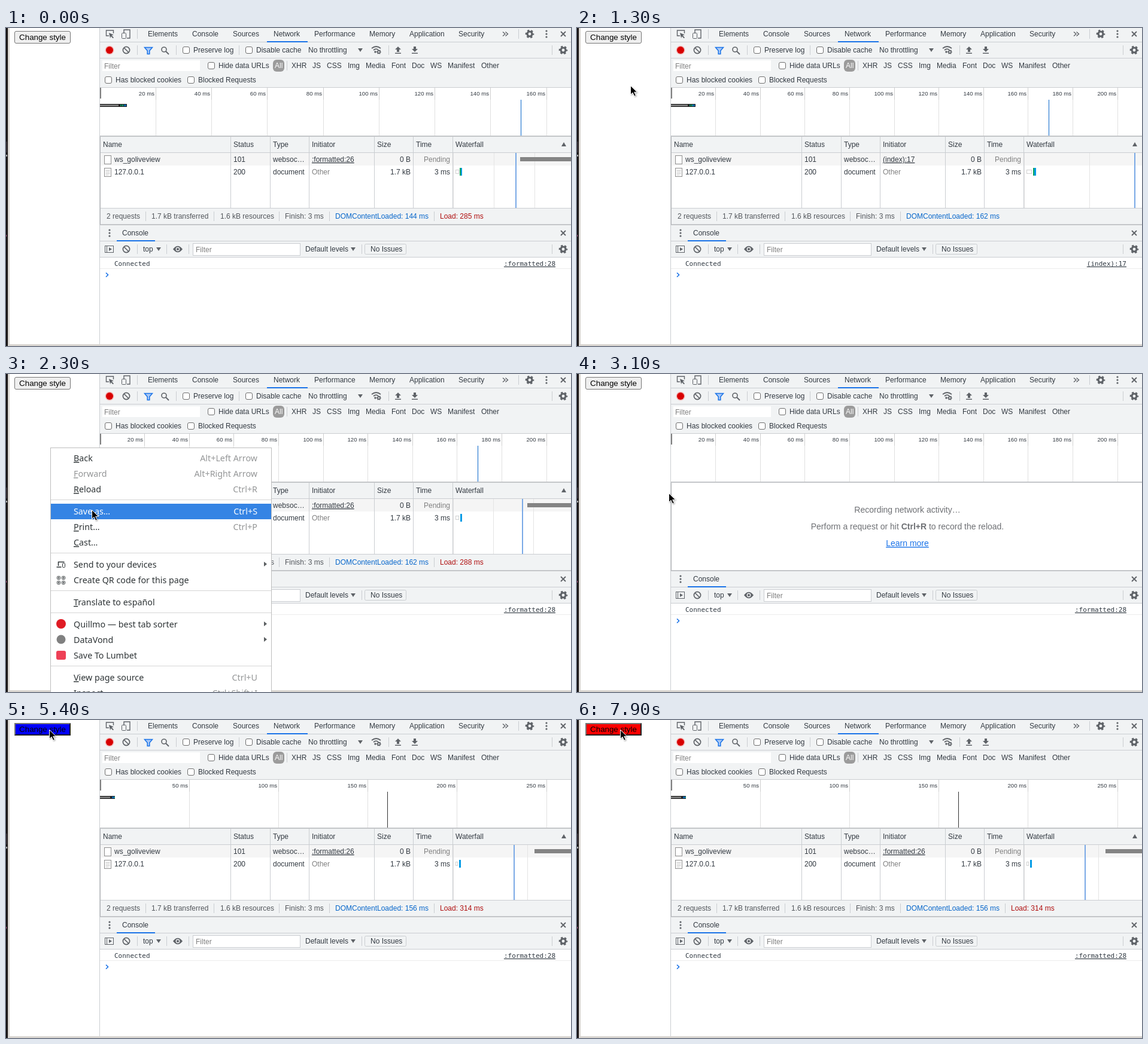
An HTML page for the animation above (8 s loop, 944 by 532 pixels).

```html
<!DOCTYPE html>
<html lang="en">
<head>
<meta charset="utf-8">
<title>Change style</title>
<style>
html, body { margin: 0; width: 100%; height: 100%; overflow: hidden; background: #fff; }
svg { position: absolute; left: 0; top: 0; }
text { font: 12px "Liberation Sans", Arial, sans-serif; fill: #333a42; white-space: pre; }
.mono { font: 11px "DejaVu Sans Mono", monospace; fill: #303942; }
.scale { font-size: 9.6px; }
.big { font-size: 14px; fill: #6e7074; }
.grey { fill: #808080; }
.end { text-anchor: end; }
.mid { text-anchor: middle; }
.link { text-decoration: underline; }
#menu text { font: 14.3px "Noto Sans", "Open Sans", sans-serif; fill: #2e3436; }
#menu .keys, #menu .off text { fill: #949697; }
#menu .on text, #menu .on .keys { fill: #fff; }
#menu .hit { fill: none; }
#menu .on .hit { fill: #3584e4; }
#menu tspan { text-decoration: underline; }
#btn {
  position: absolute; left: 14px; top: 5px; width: 94px; height: 21px; box-sizing: border-box;
  border: 1px solid #767676; border-radius: 3px; background: #efefef; color: #000;
  font: 13.333px/19px "Liberation Sans", Arial, sans-serif; text-align: center; white-space: nowrap;
}
#btn.hover { background: #e5e5e5; }
#btn.press { background: #f5f5f5; }
#btn.red, #btn.blue { border: 2px outset #767676; border-radius: 0; line-height: 17px; }
#btn.red { background: #f00; }
#btn.blue { background: #00f; }
#btn.red.press, #btn.blue.press { border-style: inset; }
</style>
</head>
<body>
<svg id="base" width="944" height="532"></svg>
<div id="btn">Change style</div>
<svg id="over" width="944" height="532"></svg>
<script>
const BAR = '#f1f3f4', LINE = '#cacdd1', INK = '#5f6368', BLUE = '#1a73e8';
const $ = id => document.getElementById(id);
const rect = (x, y, w, h, fill, more = '') =>
  `<rect x="${x}" y="${y}" width="${w}" height="${h}" fill="${fill}" ${more}/>`;
const text = (x, y, s, cls = '', more = '') => `<text x="${x}" y="${y}" class="${cls}" ${more}>${s}</text>`;
const path = (d, color = INK, w = 1.4) => `<path d="${d}" fill="none" stroke="${color}" stroke-width="${w}"/>`;
const solid = (d, fill = INK) => `<path d="${d}" fill="${fill}"/>`;
const box = (x, y, w, h, fill, stroke, r = 0) =>
  rect(x + .5, y + .5, w - 1, h - 1, fill, `stroke="${stroke}" rx="${r}"`);
const circle = (x, y, r, fill, more = '') => `<circle cx="${x}" cy="${y}" r="${r}" fill="${fill}" ${more}/>`;
const each = (list, fn) => list.map(fn).join('');

// Icons
const sep = (x, y) => rect(x, y - 8, 1, 16, LINE);
const check = (x, y) => box(x, y, 12, 12, '#fff', '#6f6f6f', 2.5);
const down = (x, y) => solid(`M${x} ${y}h8l-4 6z`);
const dots = (x, y) => each([-5, 0, 5], d => circle(x, y + d, 1.6, INK));
const cross = (x, y) => path(`M${x - 4} ${y - 4}l8 8m0 -8l-8 8`, INK, 1.8);
const gear = (x, y, s = 1) => `<g transform="translate(${x} ${y}) scale(${s})">` +
  circle(0, 0, 4, 'none', `stroke="${INK}" stroke-width="3.2"`) +
  circle(0, 0, 6, 'none', `stroke="${INK}" stroke-width="2.6" stroke-dasharray="3.2 3.083" stroke-dashoffset="1.6"`) + '</g>';
const ban = (x, y) => circle(x, y, 5.6, 'none', `stroke="${INK}" stroke-width="1.7"`) +
  path(`M${x - 4} ${y - 4}l8 8`, INK, 1.7);

function tabBar() {
  const tabs = [[237, 'Elements'], [311, 'Console'], [379, 'Sources'], [447, 'Network'],
    [515, 'Performance'], [607, 'Memory'], [674, 'Application'], [756, 'Security']];
  return rect(157, 0, 787, 100, BAR) + rect(157, 23, 787, 1, LINE) + rect(436, 22, 68, 2, BLUE) +
    each(tabs, ([x, s]) => text(x, 14, s)) +
    path('M172 13h-4.5v-9h12v5') + solid('M172 8l8 3.4l-3.4 1.2l3.4 3.4l-1.3 1.3l-3.4-3.4l-1.2 3z') +
    path('M197 8v-5h10v14h-5') + box(193, 8, 8, 10, 'none', INK, 1) +
    sep(219, 10) + path('M830 6.500l4 3.500l-4 3.500m4.500 -7l4 3.500l-4 3.500') +
    sep(856, 10) + gear(875, 10) + dots(903, 10) + cross(931, 10);
}

function toolBar() {
  return rect(157, 50, 787, 1, LINE) +
    circle(173, 37, 7.5, '#f3b9b9') + circle(173, 37, 6, '#d80000') + ban(201, 37) + sep(219, 37) +
    `<path d="M231.500 32.500h13l-4.700 5.500v5.500h-3.600v-5.500z" fill="#a9c9f7" stroke="${BLUE}" stroke-width="1.500"/>` +
    circle(264, 36, 4, 'none', `stroke="${INK}" stroke-width="1.6"`) + path('M267 39l5 5', INK, 1.8) + sep(284, 37) +
    check(295, 31) + text(313, 41, 'Preserve log') + sep(389, 37) +
    check(400, 31) + text(418, 41, 'Disable cache') + text(505, 41, 'No throttling') + down(588, 34) +
    path('M611 34q7.500 -6 15 0m-12 3q4 -3.500 8 -.5', INK, 1.7) + circle(617, 40, 1.8, INK) + gear(623, 40, .52) +
    sep(639, 37) + solid('M655 31l5 5h-3v4h-4v-4h-3zM650 41.500h10v1.500h-10z') +
    solid('M683 40l5-5h-3v-4h-4v4h-3zM678 41.500h10v1.500h-10z') + sep(912, 37) + gear(931, 37);
}

function filters() {
  const kinds = [[477, 'XHR'], [512, 'JS'], [536, 'CSS'], [571, 'Img'], [601, 'Media'], [644, 'Font'],
    [678, 'Doc'], [709, 'WS'], [738, 'Manifest'], [794, 'Other']];
  return rect(161, 54, 163, 18, '#fff') + text(164, 68, 'Filter', 'grey') +
    check(337, 57) + text(355, 67, 'Hide data URLs') +
    rect(446, 53, 19, 20, '#9b9b9b', 'rx="6"') + text(449, 67, 'All', '', 'style="fill:#fff"') + sep(469, 63) +
    each(kinds, ([x, s]) => text(x, 67, s)) +
    check(165, 81) + text(183, 91, 'Has blocked cookies') + check(303, 81) + text(321, 91, 'Blocked Requests');
}

function drawer() {
  return rect(157, 328, 787, 2, '#c4c6c9') + rect(157, 330, 787, 53, BAR) + rect(157, 356, 787, 1, LINE) +
    dots(173, 343) + text(194, 347, 'Console') + rect(185, 355, 64, 2, BLUE) + cross(931, 343) +
    box(165, 364, 15, 12, 'none', INK) + path('M168.500 364v12', INK, 1) + solid('M172 367l5 3l-5 3z') +
    ban(201, 370) + sep(219, 370) + text(229, 374, 'top') + down(251, 367) + sep(268, 370) +
    solid('M279 370q8 -10.500 16 0q-8 10.500 -16 0z') + circle(287, 370, 3.4, BAR) + circle(287, 370, 2.1, INK) +
    sep(305, 370) + box(312, 360, 180, 21, '#fff', LINE) + text(317, 375, 'Filter', 'grey') +
    text(500, 374, 'Default levels') + down(576, 367) + sep(594, 370) +
    box(599, 361, 70, 18, BAR, LINE, 2) + text(609, 374, 'No Issues') + sep(912, 370) + gear(931, 370) +
    rect(157, 383, 787, 1, LINE);
}

// Network panel
const full = {
  first: { step: 93.25, unit: 20, event: 860, line: '#0867cb', used: 45, grid: [815, 883], mark: 852, sock: 859,
    wait: 6, chip: 758, chipW: 4, green: 2, dom: 144, load: 285, init: ':formatted:26' },
  index: { step: 74.6, unit: 20, event: 788, line: '#0867cb', used: 41, grid: [856], mark: 932,
    wait: 9, chip: 762, chipW: 5, green: 2, dom: 162, init: '(index):17' },
  second: { step: 74.6, unit: 20, event: 788, line: '#0867cb', used: 41, grid: [814, 881], mark: 863, sock: 871,
    wait: 6, chip: 759, chipW: 3, green: 0, dom: 162, load: 288, init: ':formatted:26' },
  third: { step: 149.2, unit: 50, event: 637, line: '#333', used: 25, grid: [871], mark: 849, sock: 883,
    wait: 4, chip: 757, chipW: 3, green: 0, dom: 156, load: 314, init: ':formatted:26' }
};

function scale(n) {
  let out = rect(157, 99, 787, 1, LINE) + rect(157, 100, 787, 80, '#fff');
  for (let i = 1; 157 + i * n.step < 944; i++) {
    const x = Math.floor(157 + i * n.step);
    out += rect(x, 100, 1, 80, '#e0e0e0') + rect(x, 100, 1, 20, '#cfcfcf') +
      text(x - 2, 113, i * n.unit + ' ms', 'scale end');
  }
  return out + rect(157, 100, 2, 18, '#808080') + rect(157, 180, 787, 2, '#c4c6c9');
}

function overview(n) {
  const a = Math.round(n.used * .68);
  return rect(157, 127, n.used, 5, '#222') + rect(157, 128.500, a, 2, '#999') +
    rect(157 + a + 3, 128, 2, 3, '#0a8f5b') + rect(157 + a + 6, 128, 2, 3, '#12a36c') +
    rect(157 + n.used - 5, 128, 4, 3, '#0a62a8') + rect(n.event, 120, 1, 60, n.line);
}

function table(n) {
  const head = [[162, 'Name'], [380, 'Status'], [446, 'Type'], [511, 'Initiator'], [620, 'Size'],
    [685, 'Time'], [751, 'Waterfall']];
  const row = (y, name, code, type, init, size, time, link) => text(181, y, name) + text(380, y, code) +
    text(446, y, type) + text(511, y, init, link ? 'link' : 'grey') + text(676, y, size, 'end') +
    text(742, y, time, link ? 'end grey' : 'end');
  const file = y => box(164, y, 12, 15, '#fff', '#8f8f8f');
  return rect(157, 182, 787, 26, BAR) + rect(157, 208, 787, 1, LINE) + each(head, ([x, s]) => text(x, 199, s)) +
    solid('M928 198h8l-4-7z') + rect(157, 209, 787, 21, '#f5f5f5') + rect(157, 230, 787, 71, '#fff') +
    each([747, ...n.grid], x => rect(x, 209, 1, 92, '#e4e4e4')) +
    each([375, 441, 506, 615, 680, 746], x => rect(x, 182, 1, 119, LINE)) +
    file(213) + file(234) + path('M166.500 238.500h7m-7 2.500h7m-7 2.500h7m-7 2.500h5', '#b5b5b5', .8) +
    row(224, 'ws_goliveview', '101', 'websoc…', n.init, '0 B', 'Pending', true) +
    row(245, '127.0.0.1', '200', 'document', 'Other', '1.7 kB', '3 ms') +
    rect(n.mark - 1, 209, 2, 92, '#7aa9e6') + (n.sock ? rect(n.sock, 216, 944 - n.sock, 7, '#848484') : '') +
    box(751, 237, n.wait, 7, '#fff', '#d0d0d0') + rect(n.chip, 234, n.chipW, 13, '#039be5') +
    rect(n.chip, 234, n.green, 13, '#0aa55b');
}

function summary(n) {
  return rect(157, 301, 787, 27, BAR) + rect(157, 301, 787, 1, LINE) +
    each([[168, '2 requests'], [243, '1.7 kB transferred'], [358, '1.6 kB resources'], [466, 'Finish: 3 ms']],
      ([x, s]) => text(x, 319, s, '', 'style="fill:#53575c"')) +
    each([233, 347, 456, 540], x => sep(x, 315)) +
    text(550, 319, `DOMContentLoaded: ${n.dom} ms`, '', 'style="fill:#0867cb"') +
    (n.load ? sep(715, 315) + text(725, 319, `Load: ${n.load} ms`, '', 'style="fill:#b01010"') : '');
}

const edge = rect(157, 182, 1, 147, '#b4b6b9');
const loaded = n => scale(n) + overview(n) + table(n) + summary(n) + edge;
const empty = n => scale(n) + rect(157, 182, 787, 146, '#fff') + edge +
  text(552, 232, 'Recording network activity…', 'big mid') +
  text(552, 260, 'Perform a request or hit <tspan font-weight="bold">Ctrl+R</tspan> to record the reload.', 'big mid') +
  text(552, 288, 'Learn more', 'big mid link', `style="fill:${BLUE}"`);

const prompt = y => path(`M167 ${y - 3.5}l3.500 3.500l-3.500 3.500`, BLUE, 1.6);
const log = from => from ? text(181, 398, 'Connected', 'mono') + text(918, 398, from, 'mono link end') +
  rect(157, 402, 787, 1, '#ececec') + prompt(413) : prompt(394);

$('base').innerHTML = rect(0, 0, 944, 532, '#fff') + rect(0, 0, 3, 532, '#171415') + rect(3, 0, 3, 532, '#d9d5d0') +
  rect(0, 212, 2, 3, '#aaa') + rect(0, 190, 2, 18, '#332b30') + rect(0, 346, 1, 3, '#b04a80') +
  rect(3, 529, 941, 3, '#d9d5d0') + rect(156, 0, 1, 529, LINE) +
  tabBar() + toolBar() + filters() + drawer() + '<g id="net"></g><g id="log"></g>';

// Context menu: [centre y, label, shortcut, kind]; "_" marks the access key
const items = [[141, '_Back', 'Alt+Left Arrow'], [167, '_Forward', 'Alt+Right Arrow', 'off'], [193, '_Reload', 'Ctrl+R'],
  [230, 'Save _as…', 'Ctrl+S'], [256, '_Print…', 'Ctrl+P'], [282, '_Cast…'],
  [319, 'Send to your devices', '', 'sub'], [345, 'Create QR code for this page'], [382, '_Translate to español'],
  [419, 'Quillmo — best tab sorter', '', 'sub'], [445, 'DataVond', '', 'sub'], [471, 'Save To Lumbet'],
  [508, '_View page source', 'Ctrl+U'], [534, 'I_nspect', 'Ctrl+Shift+I']];
const item = ([y, label, keys = '', kind = '']) => `<g class="item ${kind === 'off' ? kind : ''}" data-y="${y}">` +
  rect(75, y - 13, 368, 26, '', 'class="hit"').replace('fill=""', '') +
  text(113, y + 5, label.replace(/_(.)/, '<tspan>$1</tspan>')) + text(420, y + 5, keys, 'keys end') +
  (kind === 'sub' ? solid(`M431 ${y - 5}l5 4l-5 4z`, '#5b5f61') : '') + '</g>';
const corner = (x, y) => box(x, y, 6, 6, 'none', '#2e3436', 1) + rect(x + 2, y + 2, 2, 2, '#2e3436');

$('over').innerHTML = '<g id="menu">' + box(74, 123, 370, 420, '#fff', '#bdbdbd') +
  each([210, 299, 362, 399, 488], y => rect(75, y, 368, 1, '#d5d5d5')) + each(items, item) +
  path('M87.500 321v-6.500h10m-13 8.500h8', '#2e3436', 1.5) + box(94, 316, 5, 8, '#fff', '#2e3436', 1) +
  corner(85, 338) + corner(93, 338) + corner(85, 346) + corner(93, 346) +
  circle(92, 418, 8, '#e01b24') + circle(92, 444, 7.5, '#808080') + rect(84, 463, 16, 15, '#ee4056', 'rx="3"') +
  '</g><g id="cursor"><path d="M0 0v15l3.500 -3.300l2.800 6l2.600 -1.200l-2.700 -5.700h4.800z" fill="#000" ' +
  'stroke="#fff" stroke-width="1" stroke-linejoin="round" style="filter:drop-shadow(1px 1px 1px #0005)"/></g>';

// Timelines: each entry holds until the next
const { first, index, second, third } = full;
const FMT = ':formatted:28', IDX = '(index):17';
const early = { ...third, load: 0, sock: 0, init: IDX };
const stages = [
  [0, loaded(first), FMT, 1], [300, empty(first), FMT, 1], [400, empty(first), '', 0],
  [500, loaded(index), IDX, 1], [600, loaded({ ...first, init: IDX }), IDX, 1], [700, loaded(first), FMT, 1],
  [1000, empty(first), FMT, 1], [1100, empty(first), '', 0], [1200, empty(index), '', 1],
  [1300, loaded(index), IDX, 1], [1400, loaded(second), FMT, 1],
  [3100, empty(second), FMT, 1], [3200, empty(second), '', 0], [3300, loaded(early), IDX, 1],
  [3400, loaded(third), FMT, 1]];
const moves = [[0, -40, 0], [1200, 112, 70], [1300, 89, 96], [1400, 78, 114], [1500, 73, 122],
  [1900, 80, 129], [2000, 95, 146], [2100, 115, 176], [2200, 133, 208], [2300, 143, 227],
  [2700, 152, 200], [2900, 153, 199], [3300, 145, 184], [3400, 128, 150], [3500, 108, 112],
  [3600, 90, 78], [3700, 76, 53], [3800, 66, 38], [3900, 63, 32], [4000, 64, 29], [4100, 68, 23],
  [4200, 71, 18], [4400, 72, 16]];
const looks = [[0, ''], [4100, 'hover'], [4400, 'press'], [4600, 'red'], [5300, 'red press'], [5400, 'blue'],
  [6100, 'blue press'], [6200, 'red'], [6900, 'red press'], [7000, 'blue'], [7700, 'blue press'], [7900, 'red']];
const at = (list, t) => list.findLast(e => e[0] <= t);
const rows = [...document.querySelectorAll('.item')];
const start = performance.now();
let shown;

function draw() {
  const t = Math.max(0, performance.now() - start) % 8000;
  const stage = at(stages, t), [, x, y] = at(moves, t);
  if (stage !== shown) {
    shown = stage;
    $('net').innerHTML = stage[1];
    $('log').innerHTML = log(stage[2]);
    $('btn').style.visibility = stage[3] ? 'visible' : 'hidden';
  }
  $('btn').className = at(looks, t)[1];
  $('cursor').setAttribute('transform', `translate(${x + .5} ${y + .5})`);
  $('menu').style.display = t >= 1700 && t < 3100 ? '' : 'none';
  for (const r of rows)
    r.classList.toggle('on', t >= 1900 && Math.abs(r.dataset.y - y) < 13 && !r.classList.contains('off'));
  requestAnimationFrame(draw);
}
draw();
</script>
</body>
</html>
```
